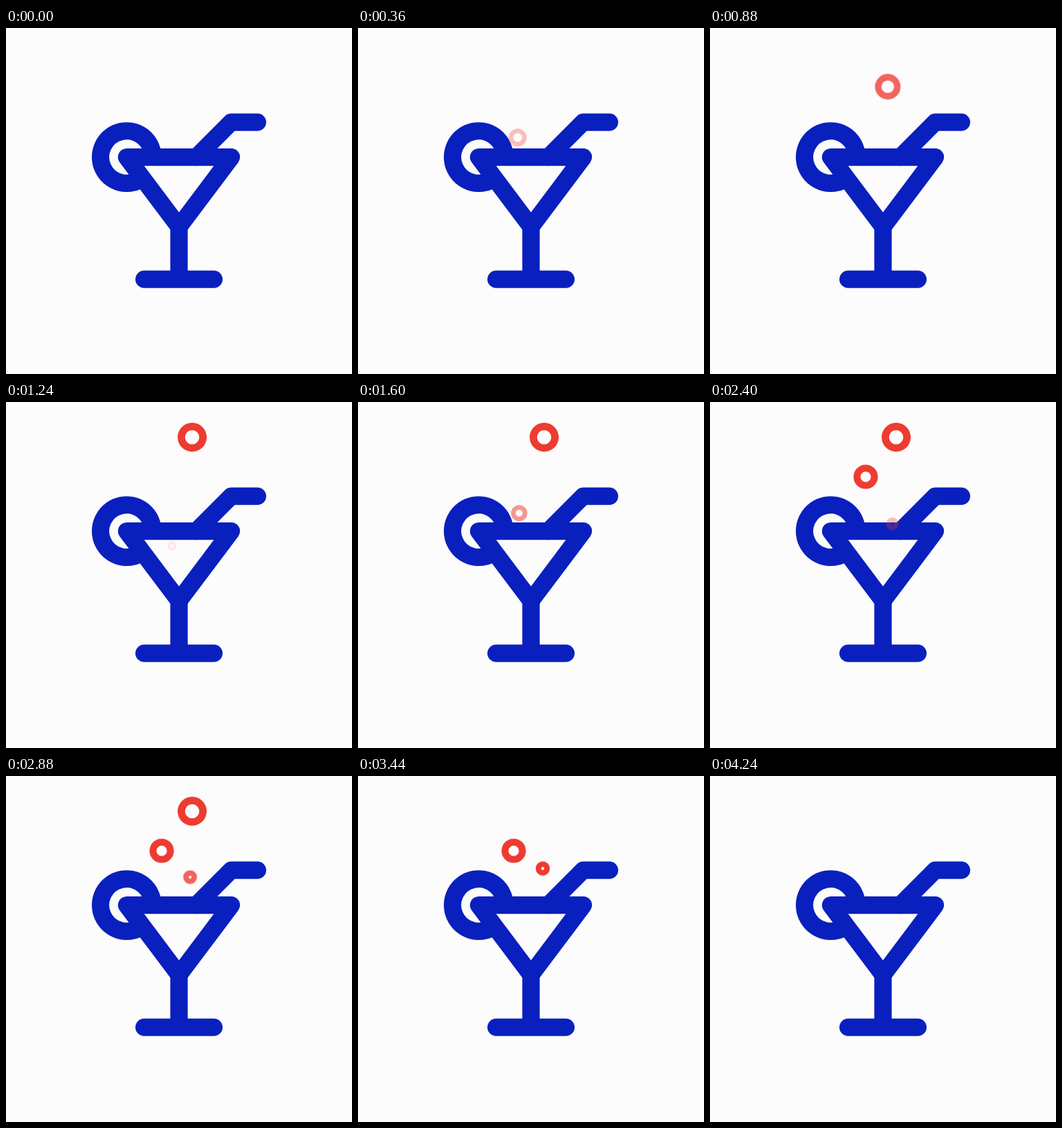
These frames come from a looping animation (500 by 500 pixels, 5000 ms). An HTML page:

```html
<!DOCTYPE html>
<html lang="en">
<head>
<meta charset="utf-8">
<title>Cocktail</title>
<style>
  html, body { margin: 0; width: 100%; height: 100%; overflow: hidden; background: #fcfcfc; }
  svg { display: block; width: 100%; height: 100%; }
  .glass { fill: none; stroke: #0a20be; stroke-width: 25.2; stroke-linejoin: round; }
  .round { stroke-linecap: round; }
  .bubble { fill: none; stroke: #ee3b32; opacity: 0; }
</style>
</head>
<body>
<svg viewBox="0 0 500 500">
  <g class="glass">
    <path d="M212.2 186.6A37.8 37.8 0 1 0 197.1 216.8"/>
    <path class="round" d="M275 186.6L325.4 136.2H363.4"/>
    <path d="M174.4 186.6H325.6L250 287.3Z"/>
    <path class="round" d="M250 287.3V363.2M199.6 363.2H300.4"/>
  </g>
  <g id="bubbles"></g>
</svg>
<script>
const LOOP = 5000, STEP = 40;

// Each bubble rises from one pose to another, rests, then vanishes at `hide`.
const bubbles = [
  { start: 0, end: 1120, hide: 3440, width: 10.7,
    from: { x: 212.5, y: 209.2, r: 9.2, opacity: 0 }, to: { x: 269, y: 50.9, r: 21 } },
  { start: 1240, end: 2000, hide: 3640, width: 10,
    from: { x: 240, y: 208, r: 6.5, opacity: 0.11 }, to: { x: 225, y: 108.1, r: 17.6 } },
  { start: 2080, end: 3080, hide: 4240, width: 8.1,
    from: { x: 262, y: 196, r: 8.5, opacity: 0 }, to: { x: 267, y: 133.6, r: 10.3 } }
];

function addBubble({ start, end, hide, width, from, to }) {
  const circle = document.createElementNS(document.querySelector('svg').namespaceURI, 'circle');
  circle.setAttribute('class', 'bubble');
  circle.setAttribute('r', to.r - width / 2);
  circle.setAttribute('stroke-width', width);
  document.getElementById('bubbles').append(circle);

  const key = (time, pose, opacity, easing = 'linear') => ({
    offset: time / LOOP,
    transform: `translate(${pose.x}px, ${pose.y}px) scale(${pose.r / to.r})`,
    opacity,
    easing
  });
  circle.animate([
    key(0, from, 0),
    key(start, from, 0),
    key(start, from, from.opacity, `steps(${(end - start) / STEP})`),
    key(end, to, 1),
    key(hide, to, 1),
    key(hide, to, 0),
    key(LOOP, to, 0)
  ], { duration: LOOP, iterations: Infinity, delay: -1 });
}

bubbles.forEach(addBubble);
</script>
</body>
</html>
```
